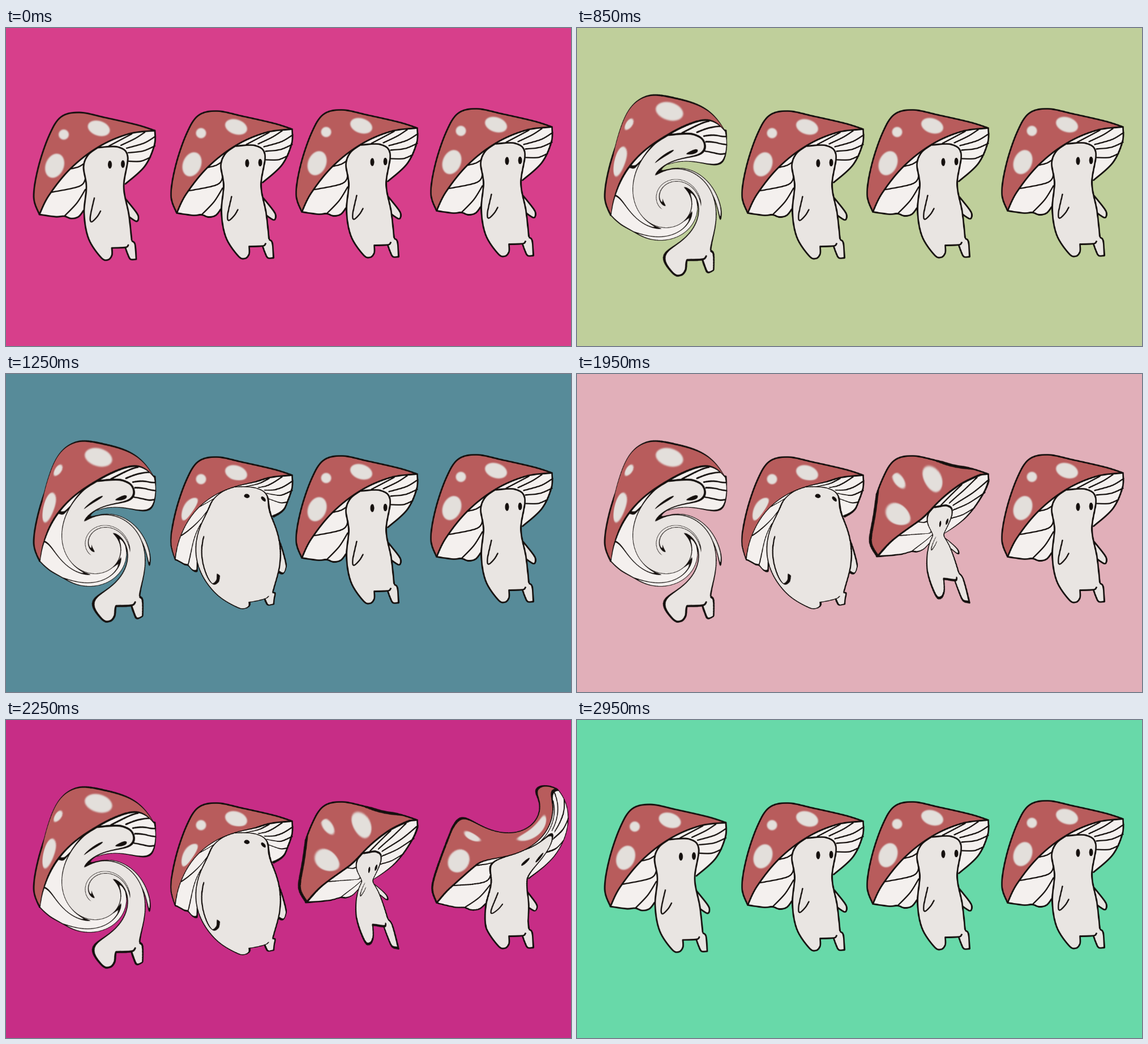
Animation of 998x561 px, one loop 3.25 s. Source, as an HTML page with a canvas:

```html
<!DOCTYPE html>
<html lang="en">
<head>
<meta charset="utf-8">
<title>Mushrooms</title>
<style>
html, body { margin: 0; width: 100%; height: 100%; overflow: hidden; }
canvas { display: block; width: 998px; height: 561px; }
</style>
</head>
<body>
<canvas id="stage" width="998" height="561"></canvas>
<script>
const INK = '#15100e', RED = '#b85c5c', BODY = '#e9e5e2', GILL = '#f4f0ee', SPOT = '#e3dfdb';
const BOX = { x: 30, y: 100, w: 280, h: 360 };
const K = 3; // sprite pixels per stage pixel

function newCanvas() {
  const c = document.createElement('canvas');
  c.width = BOX.w * K;
  c.height = BOX.h * K;
  return c;
}

// Smooth curve through points; "|" starts a new run at a sharp corner.
function trace(text) {
  const path = new Path2D();
  text.split('|').forEach((run, n) => {
    const p = run.trim().split(' ').map(s => s.split(',').map(Number));
    const at = i => p[Math.max(0, Math.min(p.length - 1, i))];
    if (n) path.lineTo(...p[0]); else path.moveTo(...p[0]);
    for (let i = 0; i < p.length - 1; i++) {
      const [a, b, c, d] = [at(i - 1), at(i), at(i + 1), at(i + 2)];
      path.bezierCurveTo(
        b[0] + (c[0] - a[0]) / 6, b[1] + (c[1] - a[1]) / 6,
        c[0] - (d[0] - b[0]) / 6, c[1] - (d[1] - b[1]) / 6, c[0], c[1]);
    }
  });
  return path;
}

function paintMushroom() {
  const canvas = newCanvas(), g = canvas.getContext('2d');
  g.scale(K, K);
  g.translate(-BOX.x, -BOX.y);
  g.lineCap = g.lineJoin = 'round';
  g.strokeStyle = INK;

  const line = (text, width = 2.8) => {
    g.lineWidth = width;
    g.stroke(trace(text));
  };
  const shape = (text, fill) => {
    g.fillStyle = fill;
    g.fill(trace(text));
  };
  const oval = (x, y, rx, ry, deg = 0) => {
    g.beginPath();
    g.ellipse(x, y, rx, ry, deg * Math.PI / 180, 0, Math.PI * 2);
    g.fill();
  };

  const rim = '263,181 216,187 163,210 114,248 76,295 59,329';
  const dome = '59,329 49,298 57,246 76,190 97,157 130,149 175,158 232,171 263,181';
  const rightEdge = '263,181 262,207 245,244 211,275';
  const leftEdge = '137,322 128,333 115,336 103,332 88,333 59,329';

  shape(rim + '|' + leftEdge.split(' ').reverse().join(' ') + '|' + rightEdge.split(' ').reverse().join(' '), GILL);
  line(rightEdge);
  line(leftEdge);
  [
    '222,187 203,197 182,208', '245,184 228,195 203,207',
    '264,191 244,203 213,212', '263,208 242,217 216,220', '255,228 238,235 217,235',
    '138,239 128,245 112,249', '141,263 130,279 79,290', '140,285 125,309 104,331'
  ].forEach(t => line(t, 2.3));

  const arm = '210,300 230,325 234,335 230,341 216,332';
  shape(arm, BODY);
  line(arm);

  const back = '162,211 198,210 215,227 208,280 217,329 222,374';
  const foot = '223,376 228,382 230,407|230,408 220,408 215,399 211,388';
  const front = '216,383 211,387 187,388|187,388 187,401 180,409 168,405 146,372 138,327 142,280 137,245 145,224 162,211';
  shape(back + '|' + foot + '|' + front.slice(8), BODY);
  [back, foot, front].forEach(t => line(t));
  line('156,300 149,332 151,342 161,333 167,323', 2.4);

  shape(dome + '|' + rim, RED);
  line(dome + '|' + rim);

  g.fillStyle = SPOT;
  g.filter = `blur(${1.1 * K}px)`;
  oval(102, 188, 9, 9);
  oval(164, 177, 20, 13, 18);
  oval(86, 243, 16, 22, 22);
  g.filter = 'none';

  g.fillStyle = INK;
  oval(183.5, 241, 3.5, 7);
  oval(206.5, 240, 3.4, 6.7);
  return canvas;
}

const clamp = v => Math.max(0, Math.min(1, v));
const smooth = v => (v = clamp(v)) * v * (3 - 2 * v);

// Each warp takes a point of the result and returns where its colour comes from.
function twirl(x, y, cx, cy, radius, degrees, power) {
  const dx = x - cx, dy = y - cy;
  const a = degrees * Math.PI / 180 * clamp(1 - Math.hypot(dx, dy) / radius) ** power;
  const c = Math.cos(a), s = Math.sin(a);
  return [cx + dx * c - dy * s, cy + dx * s + dy * c];
}

function swirled(x, y) {
  [x, y] = twirl(x, y, 167, 305, 124, 560, 3);
  const dx = x - 167, dy = y - 300;
  const f = 0.8 + 0.2 * clamp(Math.hypot(dx / 108, dy / 240)) ** 10;
  return [167 + dx * f, 300 + dy * f];
}

function bulged(x, y) {
  const dx = x - 168, dy = y - 308;
  const f = 0.3 + 0.7 * smooth((Math.hypot(dx, dy) - 50) / 72);
  return [168 + dx * f + 17 * (1 - f), 308 + dy * f - 3 * (1 - f)];
}

function pinched(x, y) {
  const dx = x - 174, dy = y - 290;
  const f = clamp(Math.hypot(dx, dy) / 132 + 1e-4) ** -0.47;
  return [174 + dx * f, 290 + dy * f];
}

function curled(x, y) {
  [x, y] = twirl(x, y, 215, 150, 140, 172, 2);
  const push = 16 * clamp(1 - (Math.hypot(x - 160, y - 240) / 135) ** 2);
  return [x - push, y - push];
}

function warp(source, from) {
  const out = newCanvas(), { width: w, height: h } = out;
  const src = new Uint32Array(source.getContext('2d').getImageData(0, 0, w, h).data.buffer);
  const image = new ImageData(w, h), dst = new Uint32Array(image.data.buffer);
  for (let j = 0; j < h; j++) {
    for (let i = 0; i < w; i++) {
      const [x, y] = from(BOX.x + (i + 0.5) / K, BOX.y + (j + 0.5) / K);
      const u = Math.floor((x - BOX.x) * K), v = Math.floor((y - BOX.y) * K);
      if (u >= 0 && v >= 0 && u < w && v < h) dst[j * w + i] = src[v * w + u];
    }
  }
  out.getContext('2d').putImageData(image, 0, 0);
  return out;
}

const plain = paintMushroom();
const warped = [swirled, bulged, pinched, curled].map(from => warp(plain, from));
const places = [[0, 0], [242.5, -2.5], [463.5, -4.5], [701.5, -6.5]];

// End time, background, how many mushrooms are warped
const scenes = [
  [250, '#d73f8b', 0], [1250, '#bfcf9b', 1], [1500, '#578b99', 2],
  [2250, '#e1afb9', 3], [2500, '#c72d86', 4], [3250, '#68d9a9', 0]
];

const ctx = document.getElementById('stage').getContext('2d');
ctx.imageSmoothingQuality = 'high';

function draw([, color, count]) {
  ctx.fillStyle = color;
  ctx.fillRect(0, 0, 998, 561);
  places.forEach(([x, y], i) => {
    ctx.drawImage(i < count ? warped[i] : plain, BOX.x + x, BOX.y + y, BOX.w, BOX.h);
  });
}

const start = performance.now();
let shown;
function tick() {
  const t = (performance.now() - start) % 3250;
  const scene = scenes.find(s => t < s[0]);
  if (scene !== shown) draw(shown = scene);
  requestAnimationFrame(tick);
}
tick();
</script>
</body>
</html>
```
